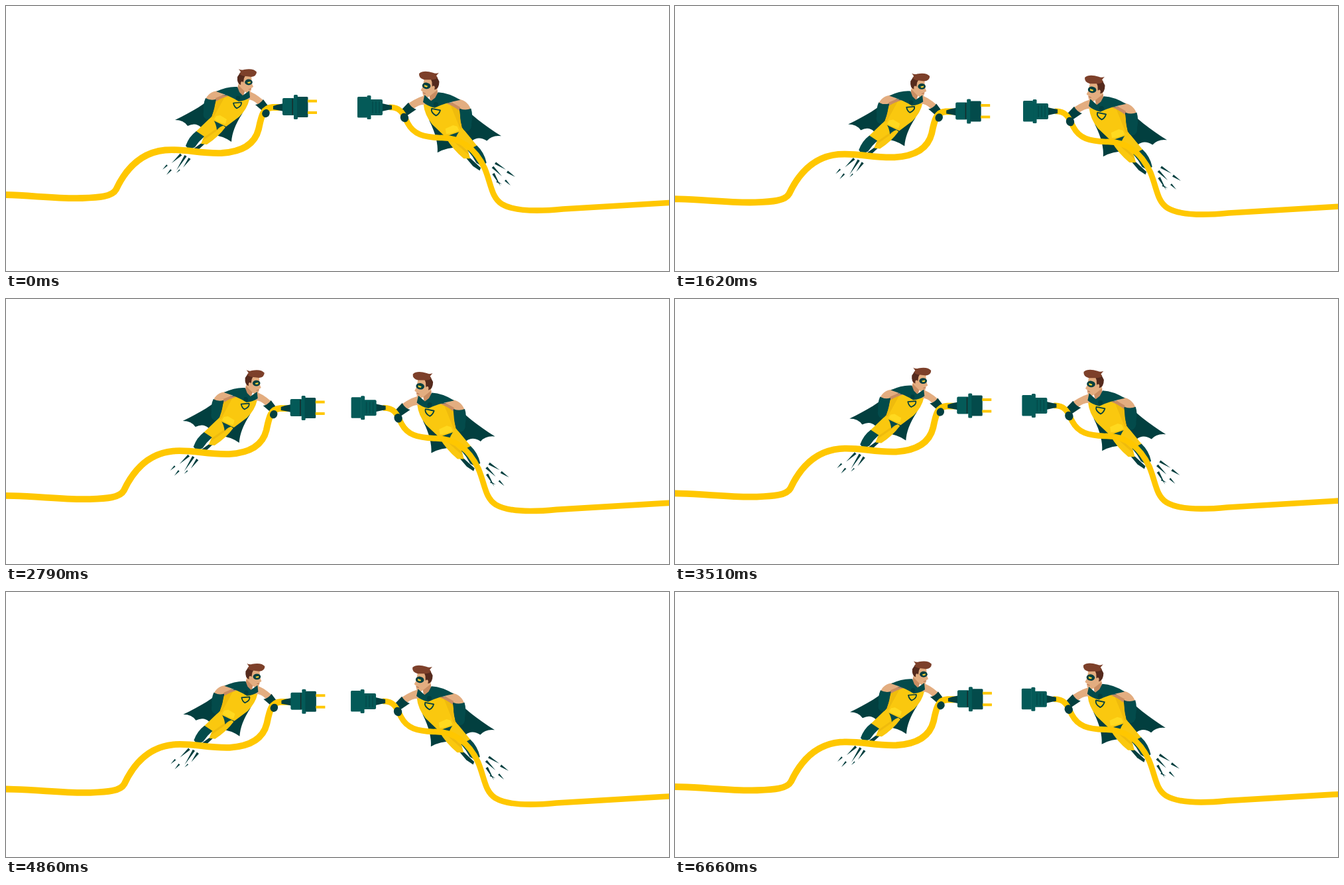
Animation of 1000 by 400 pixels, one loop 6.75 s. Source, as an HTML page:

```html
<!DOCTYPE html>
<html lang="en">
<head>
<meta charset="utf-8">
<title>Flying plugs</title>
<style>
  html, body { margin: 0; width: 100%; height: 100%; overflow: hidden; background: #fff; }
  svg { display: block; width: 100%; height: 100%; }
  .cable { fill: none; stroke: #ffc700; stroke-width: 9.8; stroke-linejoin: round; }
  .teal { fill: #045a58; }
  .deep { fill: #034b4b; }
  .dark { fill: #023f3f; }
  .gold { fill: #fac80f; }
  .shade { fill: #e3ae0c; }
  .skin { fill: #e3ad80; }
  .tan { fill: #c98d62; }
  .hair { fill: #7d402a; }
  .side { fill: #552a1d; }
</style>
</head>
<body>
<svg viewBox="0 0 1000 400">
  <defs>
    <g id="body">
      <path class="dark" d="M318 132C302 147 280 160 255 172Q268 172 274 181Q286 175 294 183L309 194Q328 196 340 205Q341 186 356 163L366 140Z"/>
      <!-- legs -->
      <path class="dark" d="M296 206L303 205L289 218L279 223L278 219Z"/>
      <path class="gold" d="M310 167L286 190L298 198L294 208L303 209Q320 198 331 183Z"/>
      <path class="shade" d="M319 184L299 198L297 203L324 184Z" opacity=".5"/>
      <path class="deep" d="M287 189L299 197Q291 204 285 213L276 217L271 211Q276 197 287 189Z"/>
      <path class="deep" d="M313 172L331 180Q323 181 318 187Q317 178 313 172Z"/>
      <!-- torso -->
      <path class="gold" d="M318 138L345 133L367 141Q364 155 352 167L332 182L309 171Q313 158 315 149Z"/>
      <path class="shade" d="M318 139L330 137L313 168L310 169Q314 157 315 149Z" opacity=".5"/>
      <path d="M317 166L323 165L333 171L331 178Q322 177 314 171Z" fill="#ffd91f"/>
      <path d="M343 146.500L355 145.500Q356 151 348 154.500Q344 152 343 146.500Z" fill="none" stroke="#023f3f" stroke-width="1.700" stroke-linejoin="round"/>
      <!-- far arm -->
      <path class="skin" d="M300 143Q305 129 320 128L332 131Q325 137 317 140L312 145Z"/>
      <path class="tan" d="M316 139L328 134L336 136Q326 138 317 144Z"/>
      <path class="deep" d="M301 139Q308 143 316 141Q315 155 311 164Q308 172 302 171Q296 168 298 159Q297 148 301 139Z"/>
      <!-- near arm -->
      <path class="skin" d="M364 128Q374 130 389 143L380 149Q373 141 364 141Z"/>
      <path class="dark" d="M376 149Q383 148 388 141L397 153L390 161Z"/>
      <!-- head and collar -->
      <path class="skin" d="M352 106L370 105L371 117L373 122L370 124Q370 131 364 132L360 129L358 137L349 130Z"/>
      <path class="tan" d="M350 119L360 129L357 137L349 130Z"/>
      <path class="deep" d="M317 129Q334 121 349 122L352 130L357 135L367 128L368 138Q361 143 351 144Q339 136 317 129Z"/>
      <circle class="dark" cx="350" cy="139" r="3.200"/>
      <path class="side" d="M353 101L361 105L359 109L358 115L354 119Q348 117 349 107Z"/>
      <path class="hair" d="M351 95Q355 97.500 359 96Q373 93.500 378 99.500Q378 106 370 107L362 106Q355 106 352 102L354 99.500Z"/>
      <ellipse class="skin" cx="356" cy="117" rx="1.900" ry="3"/>
      <ellipse class="dark" cx="366" cy="115" rx="5.800" ry="4.400"/>
      <path d="M364 115L369 114L368.500 116.500L365 117Z" fill="#f5cf35"/>
      <path d="M366 126L370 125" stroke="#a96345" stroke-width=".8"/>
    </g>
    <ellipse id="hand" class="dark" cx="392" cy="162" rx="5.600" ry="6.300" transform="rotate(28 392 162)"/>
  </defs>

  <g id="left">
    <use href="#body"/>
    <path class="dark streaks" data-at="264 224 250 237 271 226 257 248 277 230 267 244 243 240 236 247 249 247 242 255 262 247 257 252"/>
    <path class="cable" d="M-20 284.500L0 285C40 286 76 291 115 290C140 289 160 288 166 277C181 245 204 221 240 217.500C270 215 290 223 325 222C359 220 376 206 381 186C385 167 387 154 402 153H414"/>
    <use href="#hand"/>
    <path class="dark" d="M403 151L409 149L419 147V159L409 157L403 156Z"/>
    <rect class="teal" x="417" y="139" width="18" height="26" rx="2"/>
    <rect x="431.500" y="140" width="1.500" height="24" fill="#172b2b"/>
    <rect class="teal" x="434" y="134" width="6" height="37" rx="1.500"/>
    <rect class="deep" x="439" y="137" width="16.500" height="31" rx="1.500"/>
    <path d="M455 143.500H469M455 161H469" stroke="#ffc700" stroke-width="4"/>
  </g>

  <g id="right">
    <g transform="translate(636.500 118.500) rotate(6.700) scale(-1.090 1.090) translate(-364 -113)"><use href="#body"/></g>
    <path class="dark streaks" data-at="738 237 754 247 734 243 748 257 756 250 768 258 735 253 746 272 753 263 761 271 740 265 748 269"/>
    <path class="cable" d="M578 153C597 152 600 166 606 177C615 194 630 198 655 199C691 198 710 220 722 245C732 269 732 289 748 299C768 311 805 310 840 306.500L1000 297L1020 296" style="stroke-width:8.700"/>
    <g transform="translate(637.500 119) rotate(6.700) scale(-1.090 1.090) translate(-364 -113)"><use href="#hand"/></g>
    <path class="dark" d="M567 147L576 149L582 150V156L576 157L567 159Z"/>
    <rect class="teal" x="549" y="141" width="19" height="24" rx="2"/>
    <path d="M553 144V162M558 144V162M563 144V162" stroke="#034b4b" stroke-width="1.500"/>
    <rect class="teal" x="544.500" y="135" width="6" height="36" rx="1.500"/>
    <rect class="teal" x="530" y="137" width="15" height="31.500" rx="1.500"/>
  </g>
</svg>
<script>
  const LOOP = 6750, STEP = 90, PERIOD = 2025;
  const left = document.getElementById("left");
  const right = document.getElementById("right");

  // Each streak is a thin wedge from a wide start to a pointed end.
  for (const el of document.querySelectorAll(".streaks")) {
    const p = el.dataset.at.split(" ").map(Number);
    let d = "";
    for (let i = 0; i < p.length; i += 4) {
      const [x, y, u, v] = p.slice(i, i + 4);
      const len = Math.hypot(u - x, v - y);
      const w = Math.min(1.9, len / 8) / len;
      const nx = (y - v) * w, ny = (u - x) * w;
      d += `M${x + nx} ${y + ny}L${u} ${v}L${x - nx} ${y - ny}Z`;
    }
    el.setAttribute("d", d);
  }

  const move = (el, x, y) => el.setAttribute("transform", `translate(${x} ${y})`);

  function draw(now) {
    const t = Math.floor((now % LOOP) / STEP) * STEP;
    const k = 1 - Math.abs(1 - 2 * (t % PERIOD) / PERIOD);
    move(left, 15.5 * k, 16 * k);
    move(right, -12.4 * k, 15 * k);
  }

  let start;
  function tick(now) {
    start ??= now;
    draw(now - start);
    requestAnimationFrame(tick);
  }
  draw(0);
  requestAnimationFrame(tick);
</script>
</body>
</html>
```
